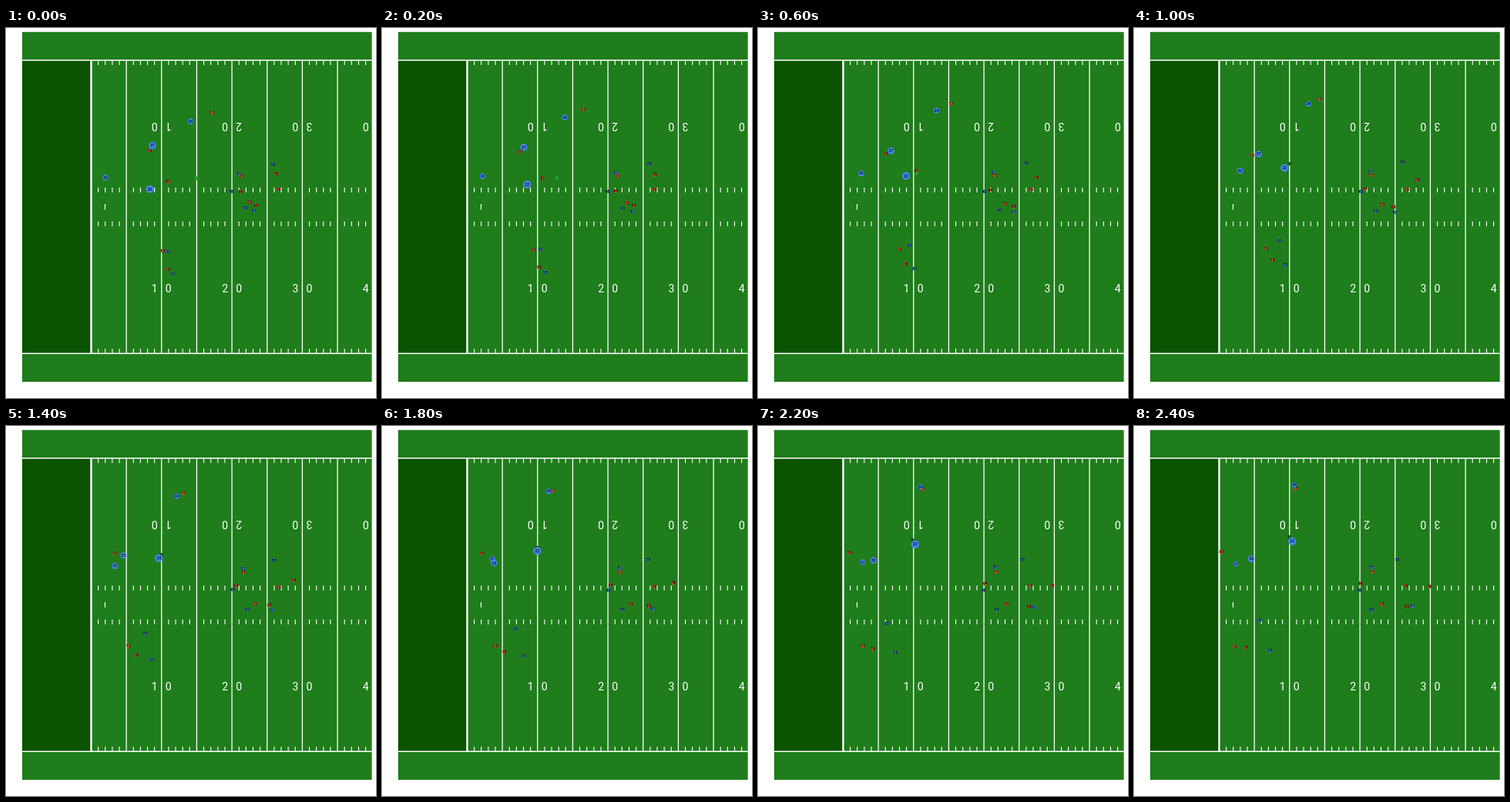
Write an HTML page that moves like this. It is 480 by 480 pixels and loops after 2600 ms.

```html
<!DOCTYPE html>
<html lang="en">
<head>
<meta charset="utf-8">
<title>Football play</title>
<style>
  html, body { margin: 0; width: 100%; height: 100%; overflow: hidden; background: #fff; }
  svg { display: block; width: 100vw; height: 100vh; }
  text { font-family: Roboto, "Liberation Sans", sans-serif; text-anchor: middle; }
  .yards { font-size: 14px; fill: #fff; }
  .label { font-size: 5px; font-weight: 500; fill: #000; }
  .red { fill: #ea4f3b; }
  .blue { fill: #4586ee; }
  .ball { fill: #16a32c; }
</style>
</head>
<body>
<svg viewBox="0 0 480 480">
  <rect x="21" y="5.2" width="453.6" height="453.8" fill="#1f7d1b"/>
  <rect x="21" y="42" width="89" height="380" fill="#0b5301"/>
  <g id="field"></g>
  <g id="play"></g>
</svg>
<script>
const field = document.getElementById('field');
const play = document.getElementById('play');

function add(parent, tag, attrs, text) {
  const el = document.createElementNS('http://www.w3.org/2000/svg', tag);
  for (const k in attrs) el.setAttribute(k, attrs[k]);
  if (text !== undefined) el.textContent = text;
  parent.appendChild(el);
  return el;
}

// Field markings
const GOAL = 110.5, YARD = 9.13, TOP = 41.8, BOTTOM = 422.2;
const line = (x1, y1, x2, y2, w) =>
  add(field, 'line', { x1, y1, x2, y2, stroke: '#fff', 'stroke-width': w });

line(21, TOP, 474.6, TOP, 1.4);
line(21, BOTTOM, 474.6, BOTTOM, 1.4);
line(GOAL, TOP, GOAL, BOTTOM, 2.4);
line(128.5, 228.5, 128.5, 235.5, 1.2);

for (let yard = 1; yard < 40; yard++) {
  const x = GOAL + yard * YARD;
  if (yard % 5 === 0) line(x, TOP, x, BOTTOM, 1.3);
  else for (const y of [TOP, 207, 251, 416]) line(x, y, x, y + 6.3, 1.1);
}

function digit(x, y, ch, turn) {
  add(field, 'text', { class: 'yards', y: 5, transform: `translate(${x} ${y}) rotate(${turn})` }, ch);
}

for (let ten = 1; ten <= 4; ten++) {
  const x = GOAL + ten * 10 * YARD;
  digit(x - 9, 338, ten, 0);
  digit(x - 9, 128, 0, 180);
  if (ten < 4) {
    digit(x + 9, 338, 0, 0);
    digit(x + 9, 128, ten, 180);
  }
}

// Players run from a to b, bowed sideways by bend at half time
const STEP = 200, STEPS = 13;
const mix = (a, b, u) => a + (b - a) * u;
const movers = [];

function run(team, num, a, b, bend = [0, 0], [r0, r1] = [2.4, 2.4]) {
  const g = add(play, 'g', {});
  const dot = add(g, 'circle', { class: team });
  const label = add(g, 'text', { class: 'label', y: 1.8 }, num);
  movers.push(t => {
    const u = t / (STEPS - 1), bow = 4 * u * (1 - u);
    const [x, y] = a.map((v, i) => mix(v, b[i], u) + bend[i] * bow);
    g.setAttribute('transform', `translate(${x} ${y})`);
    dot.setAttribute('r', mix(r0, r1, u));
  });
  return { g, label };
}

run('red', 17, [267, 110], [209.5, 81.5], [-3, -6]);
run('red', 10, [186, 159], [113, 163.5], [-2.5, 4]);
run('red', 71, [306, 192], [309.5, 189]);
run('red', 64, [304, 212], [294, 204]);
run('red', 78, [350, 189], [383, 208.5], [4, 0]);
run('red', 16, [353.5, 209], [352.5, 207], [1, 1]);
run('red', 72, [316, 226], [321.5, 231.5], [4, 1]);
run('red', 65, [324, 230], [354, 234.5]);
run('red', 13, [203, 289], [130.5, 286], [-2, -2]);
run('red', 18, [210, 313], [144.5, 287.5], [-3, -1]);
const carrier = run('red', 81, [210, 199.5], [202, 144], [-3.5, 0]);

run('blue', 51, [302, 189], [308, 183.5], [2.5, -1]);
run('blue', 58, [346, 177], [341.5, 173], [4, -1]);
run('blue', 45, [292, 212], [292, 213], [2, 0]);
run('blue', 90, [311, 233], [308, 238.5], [4, 2]);
run('blue', 91, [322, 237], [361.5, 233.5], [0, 4]);
run('blue', 30, [210, 290], [163, 252.5], [-2.5, 1.5]);
run('blue', 35, [216, 319], [176.5, 291.5], [-4, 0]);
run('blue', 24, [239.5, 121], [208, 76.5], [0, -4], [3.8, 3.2]);
run('blue', 27, [190, 152.5], [132, 179], [-4, 0], [4.8, 3.3]);
run('blue', 32, [129, 194], [152, 172.5], [-1, 0], [3.7, 4.3]);
run('blue', 22, [186.5, 209], [205.2, 149.5], [1, -3], [5.1, 5.2]);

// The ball closes in on the receiver, is caught at his feet and tucked in
const ball = add(carrier.g, 'circle', { class: 'ball', r: 2.4 });
carrier.g.insertBefore(ball, carrier.label);
movers.push(t => {
  const flight = Math.min(t / 2, 1), tuck = Math.min(Math.max(t - 2, 0) / 3, 1);
  ball.setAttribute('cx', mix(37, 0, flight));
  ball.setAttribute('cy', mix(mix(-4.5, 4, flight), 0, tuck));
});

function draw(t) {
  movers.forEach(move => move(t));
}

let start = null;
function tick(now) {
  if (start === null) start = now;
  draw(Math.floor((now - start) / STEP) % STEPS);
  requestAnimationFrame(tick);
}

draw(0);
requestAnimationFrame(tick);
</script>
</body>
</html>
```
